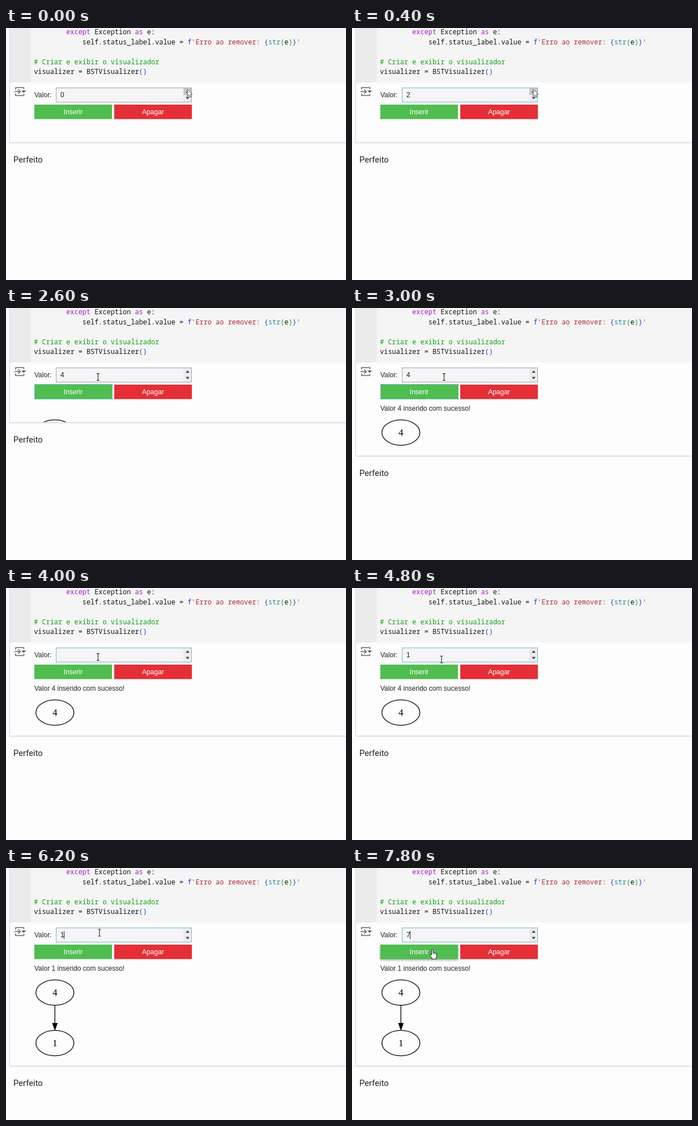
Write an HTML page with a canvas that moves like this. It is 600x444 px and loops after 8000 ms.

```html
<!DOCTYPE html>
<html lang="pt">
<head>
<meta charset="utf-8">
<title>Visualizador</title>
<style>
html, body { margin: 0; width: 100%; height: 100%; overflow: hidden; background: #fefdfe; }
canvas { display: block; width: 600px; height: 444px; }
</style>
</head>
<body>
<canvas id="stage"></canvas>
<script>
const LOOP = 8000;
const MONO = '11.9px "Noto Sans Mono", monospace';
const SANS = '12px "Liberation Sans", Arial, sans-serif';
const SERIF = '17.2px "Liberation Serif", serif';
const BODY = '14.8px Roboto, sans-serif';
const COL = 7.13, CODE_X = 49.2;

const canvas = document.getElementById('stage');
const ctx = canvas.getContext('2d');
const ratio = window.devicePixelRatio || 1;
canvas.width = 600 * ratio;
canvas.height = 444 * ratio;

// Each entry changes part of the interface state at the given time.
const timeline = [
  [0, { value: '0', focus: '', caret: false, spin: true, hover: false, bottom: 202,
        nodes: [], status: '', pointer: ['arrow', 320, 108] }],
  [200, { value: '1', focus: 'input' }],
  [400, { value: '2' }],
  [600, { value: '3' }],
  [800, { value: '4' }],
  [1200, { pointer: ['arrow', 322, 109] }],
  [1400, { caret: true }],
  [2000, { caret: false, spin: false, pointer: ['hand', 228, 143] }],
  [2200, { hover: true, pointer: ['hand', 143, 145] }],
  [2400, { focus: 'insert' }],
  [2600, { hover: false, nodes: ['4'], pointer: ['beam', 162.5, 121.5] }],
  [3000, { bottom: 261, status: 'Valor 4 inserido com sucesso!' }],
  [3200, { focus: 'input' }],
  [3400, { caret: true }],
  [4000, { value: '', caret: false }],
  [4200, { value: '1', caret: true }],
  [4400, { caret: false }],
  [4800, { pointer: ['beam', 158, 126] }],
  [5000, { hover: true, pointer: ['hand', 143, 148] }],
  [5200, { focus: 'insert' }],
  [5400, { hover: false, pointer: ['beam', 165, 114] }],
  [5800, { bottom: 349, nodes: ['4', '1'], status: 'Valor 1 inserido com sucesso!' }],
  [6000, { focus: 'input' }],
  [6200, { caret: true }],
  [6400, { value: '', caret: false }],
  [7200, { value: '7' }],
  [7600, { caret: true, pointer: ['beam', 156, 125] }],
  [7800, { hover: true, pointer: ['hand', 142, 143] }]
];

const ink = '#161616', purple = '#a91bc9', blue = '#2340c8', teal = '#2c8296',
      green = '#12a012', red = '#b02a2a';

// Baseline, first column, then coloured runs.
const code = [
  [11, 8, ['except', purple], [' Exception ', ink], ['as', purple], [' e:', ink]],
  [28.5, 12, ['self.status_label.value = ', ink], ['f', blue], ["'Erro ao remover: ", red],
    ['{', blue], ['str', teal], ['(', green], ['e', ink], [')', green], ['}', blue], ["'", red]],
  [63.5, 0, ['# Criar e exibir o visualizador', green]],
  [81, 0, ['visualizer = BSTVisualizer', ink], ['()', blue]]
];

function stateAt(time) {
  const state = {};
  for (const [start, change] of timeline) if (start <= time) Object.assign(state, change);
  return state;
}

function rect(x, y, w, h, fill) {
  ctx.fillStyle = fill;
  ctx.fillRect(x, y, w, h);
}

function frame(x, y, w, h, color) {
  ctx.strokeStyle = color;
  ctx.lineWidth = 1;
  ctx.strokeRect(x + .5, y + .5, w - 1, h - 1);
}

function text(str, x, y, font, fill, align = 'left') {
  ctx.font = font;
  ctx.fillStyle = fill;
  ctx.textAlign = align;
  ctx.fillText(str, x, y);
}

function polygon(points, fill, stroke, width = 1) {
  ctx.beginPath();
  points.forEach(([x, y]) => ctx.lineTo(x, y));
  ctx.closePath();
  if (fill) { ctx.fillStyle = fill; ctx.fill(); }
  if (stroke) { ctx.strokeStyle = stroke; ctx.lineWidth = width; ctx.stroke(); }
}

function lines(d, color, width) {
  ctx.strokeStyle = color;
  ctx.lineWidth = width;
  ctx.stroke(new Path2D(d));
}

function drawCard(bottom) {
  rect(0, 0, 600, 444, '#fefdfe');
  rect(0, 435, 600, 9, '#fcfcfc');
  rect(7, 0, 593, 96, '#f5f5f6');
  rect(7, 0, 37, 96, '#ebebec');
  rect(5, 0, 1, bottom, '#f1f1f4');
  rect(6, 0, 1, bottom, '#dedee3');
  rect(6, bottom - 1, 594, 1, '#dedee4');
  rect(6, bottom, 594, 1, '#e6e6eb');
  rect(7, bottom + 1, 593, 1, '#f5f5f8');
  text('Perfeito', 13, bottom + 34.8, BODY, '#222');
}

function drawCode() {
  for (const [y, start, ...runs] of code) {
    let col = start;
    for (const [str, color] of runs) {
      text(str, CODE_X + col * COL, y, MONO, color);
      col += str.length;
    }
  }
}

function drawIcon() {
  lines('M17 108.5V105H31.5V107.5M17 115.5V119H31.5V116.5M15 112H25M21.5 108.3L25.2 112L21.5 115.7', '#666', 1.6);
  polygon([[27, 110], [35.5, 110], [31.2, 114.5]], '#666');
}

function drawInput(s) {
  text('Valor:', 50, 122, SANS, '#222');
  rect(88, 105, 240, 26, '#f5f5f7');
  rect(313, 106, 14, 24, '#ececee');
  if (s.spin) rect(313, 106, 14, 12, '#c8c8ca');
  frame(88, 105, 240, 26, s.focus === 'input' ? '#7cb6cd' : '#a3a3a9');
  polygon([[317, 114], [324, 114], [320.5, 110]], '#444');
  polygon([[317, 121.5], [324, 121.5], [320.5, 125.5]], '#444');
  text(s.value, 96, 122, SANS, '#222');
  if (s.caret) rect(102, 111, 1, 14, '#222');
}

function drawButtons(s) {
  if (s.hover) {
    ctx.save();
    ctx.shadowColor = 'rgba(0,0,0,.4)';
    ctx.shadowBlur = 4 * ratio;
    ctx.shadowOffsetY = 1.5 * ratio;
    rect(50, 135, 137, 25, '#50bd50');
    ctx.restore();
  }
  rect(50, 135, 137, 25.5, '#50bd50');
  rect(191, 135, 137, 25.5, '#e32f35');
  if (s.focus === 'insert') frame(50, 134, 138, 27, '#74bfc0');
  text('Inserir', 118.5, 152, SANS, '#fff', 'center');
  text('Apagar', 259.5, 152, SANS, '#fff', 'center');
}

function drawTree(s) {
  ctx.save();
  ctx.beginPath();
  ctx.rect(7, 96, 593, s.bottom - 97);
  ctx.clip();
  s.nodes.forEach((label, i) => {
    const y = 219.5 + 89 * i;
    ctx.beginPath();
    ctx.ellipse(86.3, y, 33.5, 22.3, 0, 0, Math.PI * 2);
    ctx.strokeStyle = '#000';
    ctx.lineWidth = 1.3;
    ctx.stroke();
    text(label, 86.3, y + 5, SERIF, '#000', 'center');
    if (i) {
      lines(`M86.3 ${y - 66.7}V${y - 35}`, '#000', 1.3);
      polygon([[82, y - 35], [90.6, y - 35], [86.3, y - 23]], '#000', '#000');
    }
  });
  ctx.restore();
  text(s.status, 50, 181, SANS, '#222');
}

const pointers = {
  arrow() {
    polygon([[0, 0], [0, 12.5], [2.8, 9.9], [4.8, 14.4], [6.9, 13.5], [5, 9.2], [8.8, 9]], '#fff', '#444', .9);
  },
  beam() {
    lines('M-2.5 -6H-.6L0 -5.4L.6 -6H2.5M0 -5.5V5.5M-2.5 6H-.6L0 5.4L.6 6H2.5', '#222', 1.1);
  },
  hand() {
    const shape = new Path2D('M-1.3 1Q0 -.8 1.3 1V6.2Q2.8 5.3 3.8 6.8Q5.2 6 6 7.4Q7.6 7 7.6 9V12Q7.4 14 6.2 15V17.3H-1V15.5L-4.6 10.5Q-5 8.5 -3 9L-1.3 10.6Z');
    ctx.fillStyle = '#fff';
    ctx.fill(shape);
    ctx.strokeStyle = '#222';
    ctx.lineWidth = 1;
    ctx.stroke(shape);
    lines('M1.3 6V9M3.7 7V9.5M5.9 7.5V10', '#333', .7);
  }
};

function drawPointer([kind, x, y]) {
  ctx.save();
  ctx.translate(x, y);
  pointers[kind]();
  ctx.restore();
}

function render(now) {
  const s = stateAt(now % LOOP);
  ctx.setTransform(ratio, 0, 0, ratio, 0, 0);
  drawCard(s.bottom);
  drawCode();
  drawIcon();
  drawInput(s);
  drawButtons(s);
  drawTree(s);
  drawPointer(s.pointer);
  requestAnimationFrame(render);
}

render(performance.now());
</script>
</body>
</html>
```
